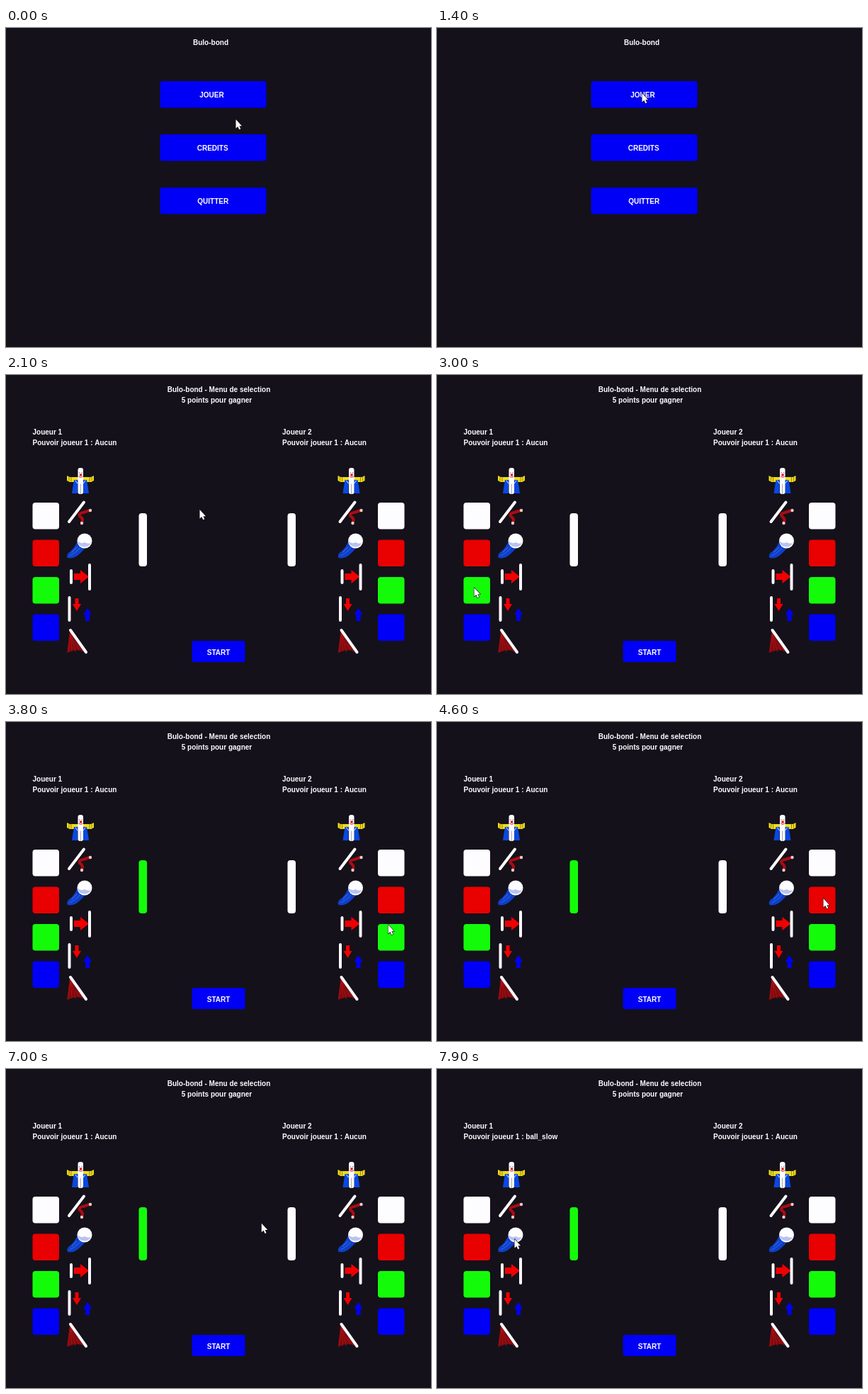
Recreate the animation shown at these times as an HTML page with a canvas. Size 600 by 450 pixels, loop 8 s.

```html
<!DOCTYPE html>
<html lang="fr">
<head>
<meta charset="utf-8">
<style>
  html, body { margin: 0; width: 100%; height: 100%; overflow: hidden; background: #14111a; }
  canvas { display: block; }
</style>
</head>
<body>
<canvas id="stage" width="600" height="450"></canvas>
<script>
const ctx = document.getElementById('stage').getContext('2d');
const LOOP = 8000, STEP = 100;
const TITLE = 'Bulo-bond';
const BG = '#14111a', WHITE = '#fdfcff', RED = '#e90000', GREEN = '#14fb0a', BLUE = '#0000f6';
const SWATCHES = [WHITE, RED, GREEN, BLUE];

// Moments of the clicks
const PLAY = 1500, PICK_GREEN = 3200, PICK_RED = 4800, PICK_WHITE = 6400, PICK_POWER = 7700;

// Pointer path: time, x, y
const PATH = [
  [0, 324, 129], [200, 322, 133], [700, 279, 100], [900, 283, 95], [1000, 296, 98],
  [1100, 289, 92], [1500, 289, 92], [2100, 273, 190], [2800, 52, 300], [3300, 52, 300],
  [3900, 578, 285], [4100, 590, 268], [4500, 545, 249], [4900, 545, 249], [5300, 573, 240],
  [5800, 571, 212], [6100, 540, 202], [6600, 540, 202], [7500, 109, 240], [8000, 109, 240]
];

function pointerAt(t) {
  const i = PATH.findIndex(key => key[0] > t);
  const [t0, x0, y0] = PATH[i - 1], [t1, x1, y1] = PATH[i];
  const p = (t - t0) / (t1 - t0), e = p * p * (3 - 2 * p);
  return [x0 + (x1 - x0) * e, y0 + (y1 - y0) * e];
}

function box(x, y, w, h, color, r = 3) {
  ctx.fillStyle = color;
  ctx.beginPath();
  ctx.roundRect(x, y, w, h, r);
  ctx.fill();
}

function text(str, x, y, align = 'left') {
  ctx.font = 'bold 10px "Liberation Sans", Arial, sans-serif';
  ctx.fillStyle = WHITE;
  ctx.textAlign = align;
  ctx.fillText(str, x, y + 3.5);
}

function shape(path, color) {
  ctx.fillStyle = color;
  ctx.fill(new Path2D(path));
}

function line(path, color = WHITE, width = 4) {
  ctx.strokeStyle = color;
  ctx.lineWidth = width;
  ctx.lineCap = 'round';
  ctx.lineJoin = 'round';
  ctx.stroke(new Path2D(path));
}

function dot(x, y, r, color) {
  ctx.fillStyle = color;
  ctx.beginPath();
  ctx.arc(x, y, r, 0, Math.PI * 2);
  ctx.fill();
}

function button(label, x, y, w, h, labelX) {
  box(x, y, w, h, BLUE);
  text(label, labelX, y + h / 2 + 1, 'center');
}

function clown() {
  shape('M86 142l4 2h30l4-2v7l-4 2H90l-4-2z', '#f0dc18');
  line('M89 144v5M92 144v6M118 144v6M121 144v5', '#6d6412', 0.7);
  shape('M96 148h18l2 12 1 7h-8v-14h-8v14h-8l1-7z', '#0a48e0');
  box(101.5, 131, 7.5, 37, WHITE, 3);
  line('M105.2 154v14', '#777', 0.7);
  line('M98 149l3 4M112 149l-3 4', '#e8e8f4', 1);
  dot(105.5, 141, 1.8, RED);
  line('M103.5 138h.2M107 138h.2', '#223', 1);
  line('M103 143.5q2.5 2 5 0', '#b01020', 0.9);
}

function bounce() {
  line('M89 207L110 179.500');
  line('M118 191L109 194Q102 195 104 199Q110 203 107 208', '#a80c12', 4);
  dot(119, 191, 2.2, '#f0c8cc');
  dot(107, 209, 2.2, '#f0c8cc');
}

function slowBall() {
  shape('M101 233Q99 241 92 248Q84 253 87 258Q96 260 103 253Q110 247 113 242z', '#0f3fc8');
  line('M90 255Q99 251 105 243M93 250l7-7', '#2a62e8', 1.2);
  dot(111, 234, 10.5, WHITE);
  shape('M100.500 234Q106 239 111 236Q116 239 120 237A10.500 10.500 0 0 1 100.500 234', '#b9c2f0');
}

function grow() {
  line('M92 276v17');
  shape('M96 280h9v-5l12 9.500-12 9.500v-5h-9z', '#f00000');
  line('M118 268v34');
}

function swap() {
  line('M89.500 314v32');
  shape('M97.500 315h5v8h3.500l-6 10-6-10h3.500z', '#f00000');
  shape('M115 329l6 9h-3v9h-6v-9h-3z', BLUE);
}

function smash() {
  shape('M90 361L96 375 111 389 98 388 86 392 88 376z', '#7d0a0e');
  for (let i = 0; i < 5; i++) line(`M91 364L${88 + i * 5} ${390 - i % 2 * 2}`, '#b01014', 1);
  line('M91 360L113 391');
}

function powers(dx) {
  ctx.save();
  ctx.translate(dx, 0);
  [clown, bounce, slowBall, grow, swap, smash].forEach(draw => draw());
  ctx.restore();
}

function mainMenu() {
  text(TITLE, 289, 20, 'center');
  button('JOUER', 217.5, 75, 150, 37.5, 290.5);
  button('CREDITS', 217.5, 150, 150, 37.5, 291.7);
  button('QUITTER', 217.5, 225, 150, 37.5, 292.2);
}

function selectionMenu(t) {
  text(TITLE + ' - Menu de selection', 300.5, 20, 'center');
  text('5 points pour gagner', 297.5, 35, 'center');
  text('Joueur 1', 37.5, 80);
  text('Pouvoir joueur 1 : ' + (t < PICK_POWER ? 'Aucun' : 'ball_slow'), 37.5, 95);
  text('Joueur 2', 390, 80);
  text('Pouvoir joueur 1 : Aucun', 390, 95);
  SWATCHES.forEach((color, i) => {
    for (const x of [37.5, 525]) box(x, 180 + i * 52.5, 37.5, 37.5, color, 4);
  });
  powers(0);
  powers(382.5);
  box(187.5, 195, 11.5, 75, t < PICK_GREEN ? WHITE : GREEN, 4);
  box(397.5, 195, 11.5, 75, t >= PICK_RED && t < PICK_WHITE ? RED : WHITE, 4);
  button('START', 262.5, 375, 75, 30, 300);
}

function pointer(t) {
  const arrow = 'M.5 0V12.500L3.300 10 5.300 14.200 7.300 13.300 5.400 9.200H9z';
  ctx.save();
  ctx.translate(...pointerAt(t));
  line(arrow, '#111', 1.2);
  shape(arrow, '#fff');
  ctx.restore();
}

function render(now) {
  const t = Math.floor(now % LOOP / STEP) * STEP;
  ctx.fillStyle = BG;
  ctx.fillRect(0, 0, 600, 450);
  if (t < PLAY) mainMenu();
  else selectionMenu(t);
  pointer(t);
  requestAnimationFrame(render);
}
requestAnimationFrame(render);
</script>
</body>
</html>
```
